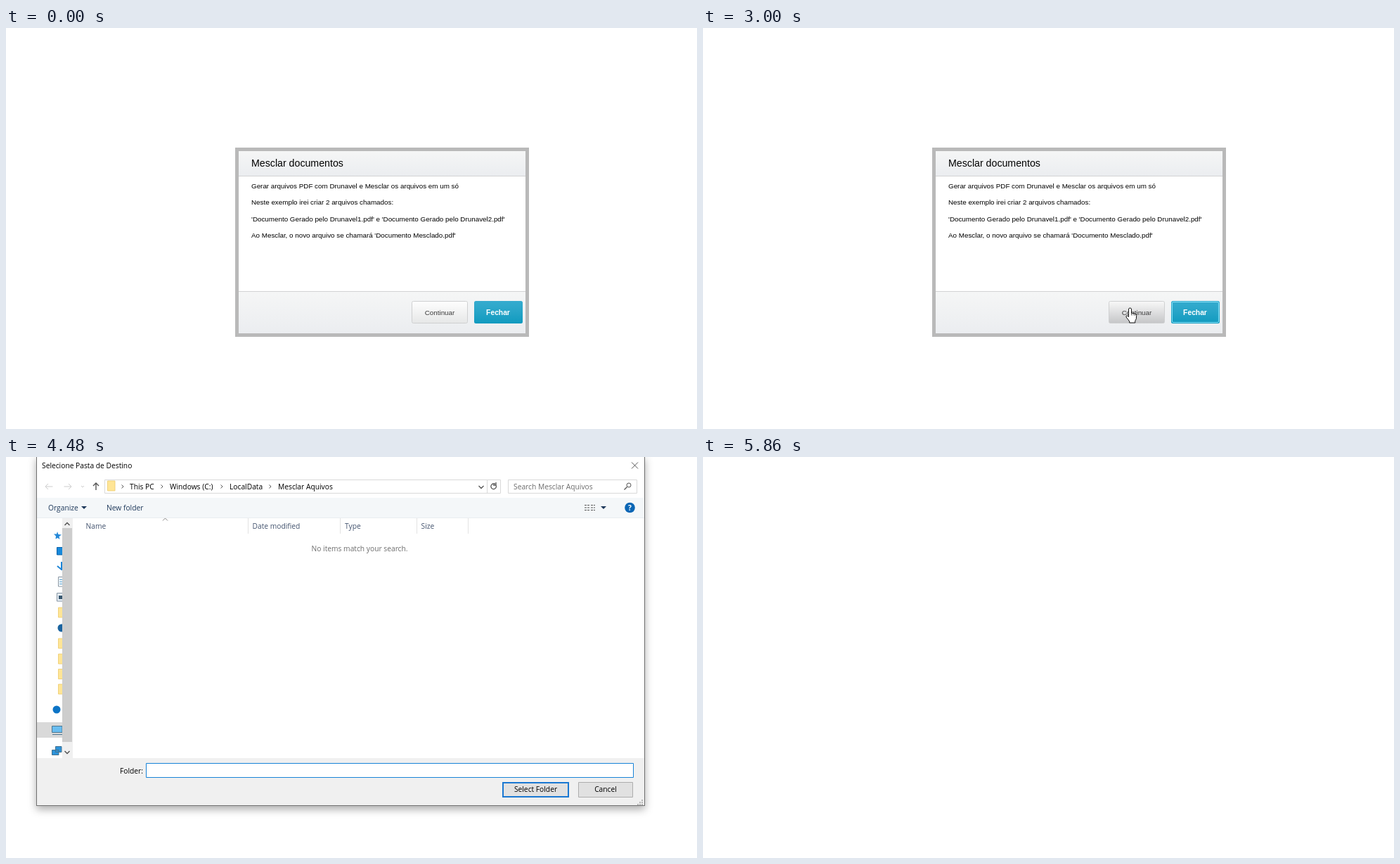
An HTML page for the animation above (8 s loop, 983 by 570 pixels).

```html
<!DOCTYPE html>
<html lang="pt">
<head>
<meta charset="utf-8">
<title>Mesclar documentos</title>
<style>
  html, body { margin: 0; width: 100%; height: 100%; overflow: hidden; background: #fff; }
  svg { display: block; }
  text { white-space: pre; }
  #merge, #picker { transform-box: view-box; }
  #merge { font: 9.83px Arial, "Liberation Sans", sans-serif; transform-origin: 535px 304.5px; }
  #picker { font: 10.25px "Open Sans", "Noto Sans", sans-serif; transform-origin: 476px 247px; }
  .shadow { filter: drop-shadow(0 5px 6px rgba(0, 0, 0, .32)); }
  .line { fill: none; stroke: #555; }
  .mid { text-anchor: middle; }
  .head { fill: #44546f; }
  .tool { fill: #1e395b; }
  .dim { fill: #6d6d6d; }
</style>
</head>
<body>
<svg width="983" height="570" viewBox="0 0 983 570">
  <defs>
    <linearGradient id="bar" x2="0" y2="1"><stop stop-color="#f5f6f6"/><stop offset="1" stop-color="#ebedf0"/></linearGradient>
    <linearGradient id="light" x2="0" y2="1"><stop stop-color="#fefefe"/><stop offset="1" stop-color="#e6e7e7"/></linearGradient>
    <linearGradient id="dark" x2="0" y2="1"><stop stop-color="#f8f8f8"/><stop offset="1" stop-color="#c5c6c8"/></linearGradient>
    <linearGradient id="blue" x2="0" y2="1"><stop stop-color="#35abcf"/><stop offset=".45" stop-color="#28a5c8"/><stop offset="1" stop-color="#109abf"/></linearGradient>
    <clipPath id="nav"><path d="M44 87H80V428H44z"/></clipPath>
    <path id="next" class="line" d="M-1.5-2.5L1 0-1.5 2.5"/>
    <path id="folder" fill="#ffe596" stroke="#ecca6a" stroke-width=".8" d="M74.5-7H85V7H74.5z"/>
  </defs>

  <g id="merge">
    <path fill="#b9b9b9" d="M326 170H744V439H326z"/>
    <path fill="#fff" d="M331 175H739V434H331z"/>
    <path fill="url(#bar)" d="M331 175H739V210H331z"/>
    <path fill="url(#bar)" d="M331 375H739V434H331z"/>
    <path stroke="#d2d3d4" d="M331 210.5H739M331 374.5H739"/>
    <text x="349" y="197" font-size="14.2">Mesclar documentos</text>
    <text x="349" y="227.5">Gerar arquivos PDF com Drunavel e Mesclar os arquivos em um só</text>
    <text x="349" y="251">Neste exemplo irei criar 2 arquivos chamados:</text>
    <text x="349" y="274.5">'Documento Gerado pelo Drunavel1.pdf' e 'Documento Gerado pelo Drunavel2.pdf'</text>
    <text x="349" y="298">Ao Mesclar, o novo arquivo se chamará 'Documento Mesclado.pdf'</text>
    <rect id="continue" x="577.5" y="388.5" width="79" height="31" rx="2" stroke="#cfd0d1"/>
    <text class="mid" x="617" y="407.5" fill="#3c3c3c">Continuar</text>
    <rect x="666" y="388" width="69" height="32" rx="2.5" fill="url(#blue)"/>
    <rect id="focus" x="667.5" y="389.5" width="66" height="29" rx="1.5" fill="none" stroke="#86e0f6"/>
    <text class="mid" x="700" y="407.5" fill="#fff" font-weight="bold" font-size="10.3">Fechar</text>
  </g>

  <g id="picker">
    <rect class="shadow" x="43.5" y="-1.5" width="865" height="497" fill="#fff" stroke="#707070"/>
    <text x="51" y="16">Selecione Pasta de Destino</text>
    <path class="line" stroke="#111" d="M890 7.500l9 9m0-9l-9 9"/>

    <!-- address bar -->
    <path class="line" style="stroke:#ccc" d="M66.500 42H56m4-4l-4 4 4 4M82.500 42H93m-4-4l4 4-4 4M107 41l2 2 2-2"/>
    <path class="line" stroke-width="1.4" d="M128 47V37m-4 4l4-4 4 4"/>
    <path class="line" style="stroke:#d9d9d9" d="M140.500 32.500H703.500V51.500H140.500zM684.500 32.500V51.500M714.500 32.500H897.500V51.500H714.500z"/>
    <use href="#folder" x="70" y="41"/>
    <use href="#next" x="166" y="42"/><text x="176" y="45.500">This PC</text>
    <use href="#next" x="222" y="42"/><text x="233" y="45.500">Windows (C:)</text>
    <use href="#next" x="307" y="42"/><text x="318" y="45.500">LocalData</text>
    <use href="#next" x="376" y="42"/><text x="387" y="45.500">Mesclar Aquivos</text>
    <path class="line" stroke-width="1.3" d="M672.500 41l3.500 3.500 3.500-3.500M697 40a3.800 3.800 0 1 1-3-2l2 0m1-2v4h-4"/>
    <text class="dim" x="722" y="45.500">Search Mesclar Aquivos</text>
    <path class="line" stroke-width="1.3" d="M883.500 42.500l-4 4"/><circle class="line" cx="886" cy="40" r="3"/>

    <!-- toolbar -->
    <path fill="#f4f7f9" d="M44 58H908V86H44z"/><path stroke="#e9edf0" d="M44 86.500H908"/>
    <text class="tool" x="60" y="75.500">Organize</text><path class="tool" d="M107 70h8l-4 4z"/>
    <text class="tool" x="143" y="75.500">New folder</text>
    <path class="line" stroke-dasharray="3 1" d="M823 68.500h7M823 72h7M823 75.500h7M832 68.500h6M832 72h6M832 75.500h6"/>
    <path class="tool" d="M846 70h8l-4 4z"/>
    <circle cx="887.500" cy="72" r="7.300" fill="#0b66b5"/>
    <text class="mid" x="887.500" y="75.800" fill="#fff" font-weight="bold">?</text>

    <!-- navigation -->
    <g clip-path="url(#nav)">
      <path fill="#d9d9d9" d="M44 377H80V399H44z"/>
      <path fill="#2488d8" d="M73 106l1.500 4 4.500.500-3.500 2.500 1 4-3-2-3 1.500.500-4-3-3 4 0z"/>
      <path fill="#1689dc" stroke="#0b62a8" d="M72.500 128.500H90V139H72.500z"/>
      <path fill="none" stroke="#1c85d7" stroke-width="2" d="M73 155l6 5M79 149V161"/>
      <path fill="#fff" stroke="#8795a3" d="M74.500 170.500H88V184H74.500z"/><path stroke="#4b9bd0" d="M76 174.500h5m-5 3h5m-5 3h5"/>
      <path fill="#e4edf4" stroke="#8795a3" d="M72.500 193.500H88V205H72.500z"/><path fill="#37576f" d="M75 197h6v5h-6z"/>
      <use href="#folder" y="221"/><use href="#folder" y="265"/><use href="#folder" y="287"/>
      <use href="#folder" y="308.500"/><use href="#folder" y="330"/>
      <circle cx="79" cy="243" r="5.500" fill="#1a639f"/>
      <circle cx="72" cy="359" r="5.500" fill="#0c74c6"/>
      <path fill="#69bdf0" stroke="#4d768f" d="M65.500 382.500H80V391.500H65.500z"/><path stroke="#4d768f" d="M66 394.500H80"/>
      <path fill="#2d93da" stroke="#45718d" d="M70.500 411.500H79V419.500H70.500zM65.500 416.500H75V423.500H65.500z"/>
    </g>
    <path fill="#f0f0f0" d="M80 87H95V428H80z"/><path fill="#cdcdcd" d="M80 101H94V405H80z"/>
    <path class="line" stroke-width="1.500" d="M83.500 97l3.500-3.500 3.500 3.500M83.500 418l3.500 3.500 3.500-3.500"/>

    <!-- list -->
    <path class="line" style="stroke:#888" d="M223 90.500l3.500-3.500 3.500 3.500"/>
    <path stroke="#e3e3e3" d="M344.500 87V109M475.500 87V109M584.500 87V109M657.500 87V109"/>
    <g class="head">
      <text x="113.500" y="101.500">Name</text><text x="350.500" y="101.500">Date modified</text>
      <text x="482" y="101.500">Type</text><text x="590.500" y="101.500">Size</text>
    </g>
    <text class="mid dim" x="503" y="133.500">No items match your search.</text>

    <!-- footer -->
    <path fill="#f0f0f0" d="M44 428H908V495H44z"/>
    <text x="162" y="449.500">Folder:</text>
    <path fill="#fff" stroke="#1883d7" d="M199.500 435.500H892.500V455.500H199.500z"/>
    <path id="caret" stroke="#000" d="M204.500 438V452"/>
    <path fill="#e1e1e1" stroke="#1a78d2" stroke-width="2" d="M707 463H800V483H707z"/>
    <path id="hover" fill="#e5f1fb" stroke="#0078d7" d="M706.500 462.500H800.500V483.500H706.500z"/>
    <g id="press">
      <path fill="#cce4f7" stroke="#005499" d="M706.500 462.500H800.500V483.500H706.500z"/>
      <path fill="none" stroke="#7a7a7a" d="M199.500 435.500H892.500V455.500H199.500z"/>
    </g>
    <text class="mid" x="753.500" y="476">Select Folder</text>
    <path fill="#e1e1e1" stroke="#adadad" d="M814.500 462.500H891.500V483.500H814.500z"/>
    <text class="mid" x="853" y="476">Cancel</text>
    <path stroke="#b5b5b5" stroke-width="2" stroke-dasharray="2 1" d="M904 488h2M901 491h5M898 494h8"/>
  </g>

  <circle id="halo" r="11" fill="#fff000" fill-opacity=".55"/>
  <g id="cursor" fill="#fff" stroke="#111" stroke-linejoin="round">
    <path id="arrow" d="M.5.500V16l3.500-3.500 2.400 5.700 2.300-1-2.400-5.500h4.900z"/>
    <g id="hand">
      <path d="M-2.500 2.500a2 2 0 0 1 4 0v5l5.500 1.200q1.800.400 1.700 2.300l-.4 5-1.600 3v2.500h-8v-2l-4.600-6q-.8-1.600.7-2.100 1.200-.200 2.700 1.800z"/>
      <path fill="none" stroke-width=".7" d="M1.500 7.500v3.500m2.500-3v3m2.500-2.500v3"/>
    </g>
  </g>
</svg>
<script>
const LOOP = 8000;
const el = id => document.getElementById(id);
const ramp = (t, a, b) => Math.min(1, Math.max(0, (t - a) / (b - a)));
const easeOut = (p, n) => 1 - (1 - p) ** n;
const mix = (a, b, p) => a + (b - a) * p;
const show = (id, opacity) => { el(id).style.opacity = +opacity; };

function zoom(id, scale, opacity) {
  el(id).style.transform = `scale(${scale})`;
  show(id, opacity);
}

function cursorAt(t) {
  if (t < 3340) {
    const enter = easeOut(ramp(t, 480, 1260), 1.7), nudge = ramp(t, 1600, 1800);
    return [mix(811, 603, enter) + 5 * nudge, mix(564, 394, enter) + 3.5 * nudge];
  }
  if (t < 4480) return [606, 408];
  const enter = easeOut(ramp(t, 4500, 5010), 1.7);
  return [mix(778, 743, enter), mix(526, 475, enter)];
}

function draw(t) {
  const [x, y] = cursorAt(t);
  const overContinue = t >= 500 && t < 3340 && x < 657 && y < 420;
  const overSelect = t >= 4540 && y < 483;

  const leave = ramp(t, 3040, 3410);
  zoom("merge", 1 - .08 * leave, 1 - leave);
  el("continue").setAttribute("fill", overContinue ? "url(#dark)" : "url(#light)");
  show("focus", t >= 2200);

  const open = easeOut(ramp(t, 3640, 4010), 3.5), close = ramp(t, 5590, 5860);
  zoom("picker", .9 + .1 * open - .08 * close, ramp(t, 3640, 3850) * (1 - close));
  show("caret", t < 4480 || (t >= 5010 && t < 5280));
  show("hover", overSelect);
  show("press", ramp(t, 5220, 5480) * (t >= 5280));

  const firstClick = t >= 2200 && t < 2600, secondClick = t >= 5280 && t < 5670;
  show("halo", firstClick || secondClick);
  el("halo").setAttribute("transform", firstClick ? "translate(606 397)" : "translate(742 475)");

  const visible = (t >= 500 && t < 3940) || (t >= 4540 && t < 5800);
  show("cursor", visible * (1 - close));
  el("cursor").setAttribute("transform", `translate(${x} ${y})`);
  show("hand", overContinue);
  show("arrow", !overContinue);
}

function tick() {
  draw(performance.now() % LOOP);
  requestAnimationFrame(tick);
}
tick();
</script>
</body>
</html>
```
